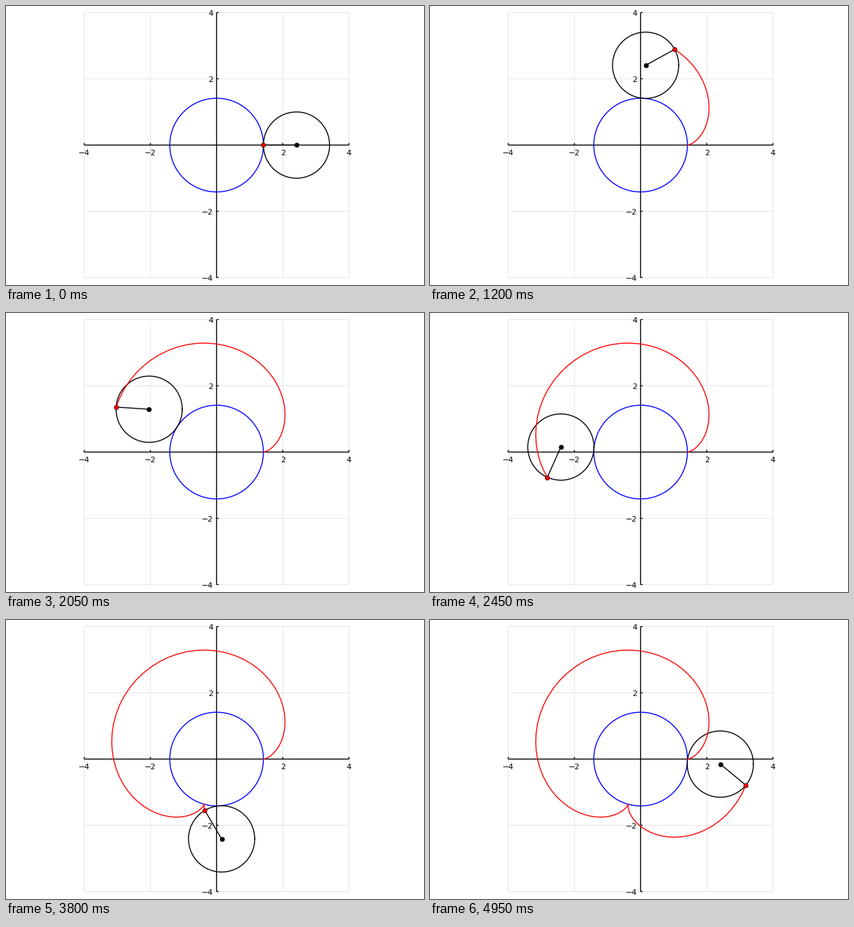
A matplotlib script for the animation above (5000 ms loop, 600 px wide and 400 px high).

```python
import numpy as np
import matplotlib.pyplot as plt
from matplotlib.animation import FuncAnimation

W, H, DPI = 600, 400, 100
FRAMES, INTERVAL = 100, 50
SCALE = 47.5                # pixels per unit
CX, CY = 302.3, 199.4       # pixel position of the origin, from the top left
BASE, ROLL = np.sqrt(2), 1.0
PT = 72 / DPI               # points per pixel
LINE = 1.0

plt.rcParams["font.family"] = "DejaVu Sans"
fig = plt.figure(figsize=(W / DPI, H / DPI), dpi=DPI, facecolor="white")
ax = fig.add_axes([0, 0, 1, 1])
ax.set_xlim(-CX / SCALE, (W - CX) / SCALE)
ax.set_ylim((CY - H) / SCALE, CY / SCALE)
ax.axis("off")


def line(xs, ys, color="black", width=LINE, **kw):
    return ax.plot(xs, ys, color=color, lw=width, snap=False, **kw)[0]


def dot(color):
    return ax.plot([], [], "o", ms=7 * PT - 0.4, mfc=color, mec="black",
                   mew=0.4, snap=False)[0]


def label(x, y, value, align):
    text = str(value).replace("-", "\u2212")
    ax.text(x, y, text, size=8, ha=align, va="baseline")


def draw_axes():
    px = 1 / SCALE
    for v in (-4, -2, 2, 4):
        grid = dict(width=PT, alpha=0.1, solid_capstyle="butt")
        line([v, v], [-4, 4], **grid)
        line([-4, 4], [v, v], **grid)
    line([-4, 4], [0, 0], solid_capstyle="butt")
    line([0, 0], [-4, 4], solid_capstyle="butt")
    for v in (-4, -2, 2, 4):
        line([v, v], [0, 3 * px], solid_capstyle="butt")
        line([0, 3 * px], [v, v], solid_capstyle="butt")
        label(v, -14.6 * px, v, "center")
        label(-5 * px, v - 4.2 * px, v, "right")


def centre(t):
    d = BASE + ROLL
    return d * np.cos(t), d * np.sin(t)


def pen(t):
    x, y = centre(t)
    spin = t * (BASE + ROLL) / ROLL
    return x - ROLL * np.cos(spin), y - ROLL * np.sin(spin)


draw_axes()
turn = np.linspace(0, 2 * np.pi, 201)
angles = 2 * np.pi * np.arange(FRAMES) / FRAMES
line(BASE * np.cos(turn), BASE * np.sin(turn), "blue")
wheel = line([], [])
arm = line([], [])
hub = dot("black")
trace = line([], [], "red")
tip = dot("red")


def update(i):
    t = angles[i]
    cx, cy = centre(t)
    px, py = pen(t)
    wheel.set_data(cx + ROLL * np.cos(turn), cy + ROLL * np.sin(turn))
    arm.set_data([cx, px], [cy, py])
    hub.set_data([cx], [cy])
    trace.set_data(*pen(angles[:i + 1]))
    tip.set_data([px], [py])
    return wheel, arm, hub, trace, tip


anim = FuncAnimation(fig, update, frames=FRAMES, interval=INTERVAL,
                     init_func=lambda: update(0), repeat=True, repeat_delay=0)
plt.show()
```
